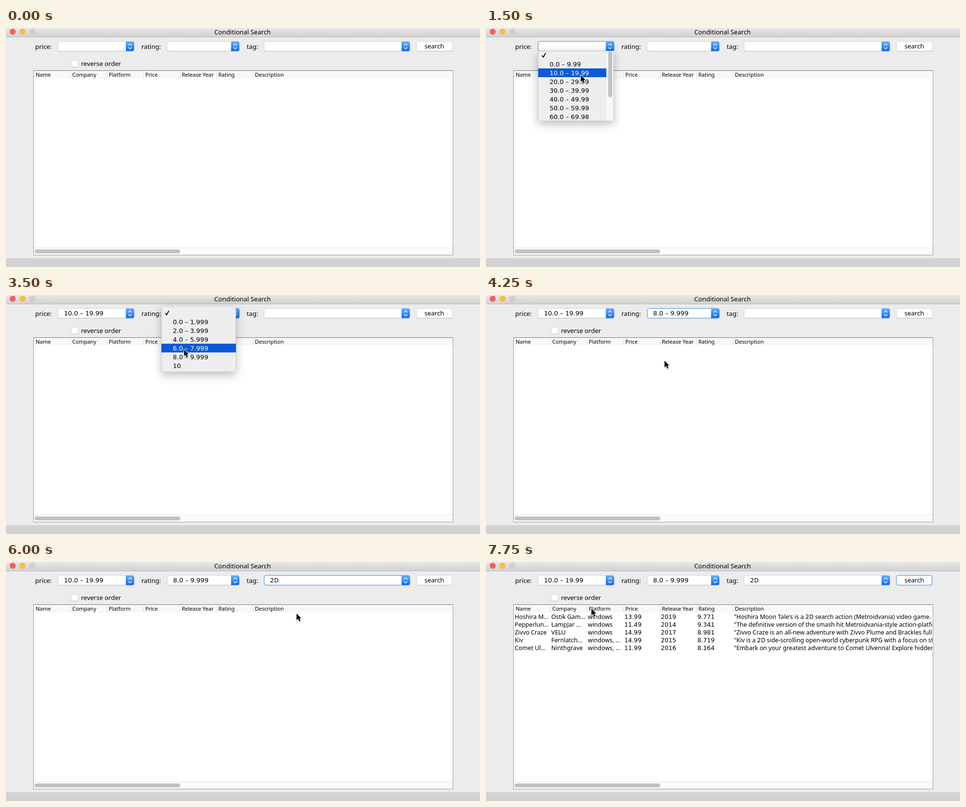
Animation of 973x491 px, one loop 8 s. Source, as an HTML page with a canvas:

```html
<!DOCTYPE html>
<html lang="en">
<head>
<meta charset="utf-8">
<title>Conditional Search</title>
<style>
html, body { margin: 0; width: 100%; height: 100%; overflow: hidden; background: #ececec; }
canvas { display: block; }
</style>
</head>
<body>
<canvas id="stage" width="973" height="491"></canvas>
<script>
const ctx = document.getElementById('stage').getContext('2d');
const LOOP = 8000, STEP = 250, ROW = 18, COLUMN = 75;
const SANS = '"Noto Sans", "Open Sans", sans-serif';
const DIGITS = '"DejaVu Sans", sans-serif';

const ranges = (count, size, tail) => Array.from({ length: count },
  (_, i) => `${i * size}.0 – ${(i + 1) * size - 1}.${tail}`);

// The chosen item appears when the menu closes
const COMBOS = [
  { label: 'price:', labelX: 60, x: 107, w: 156, scroll: 94, pick: 2,
    items: ['', ...ranges(6, 10, '99'), '60.0 – 69.98'], focus: 500, open: 750, close: 2000, blur: 3000 },
  { label: 'rating:', labelX: 278, x: 331, w: 148, scroll: 0, pick: 5,
    items: ['', ...ranges(5, 2, '999'), '10'], focus: 3000, open: 3000, close: 4250, blur: 6000 },
  { label: 'tag:', labelX: 494, x: 530, w: 299, scroll: 18, pick: 3,
    items: ['', '1980s', "1990's", '2D', '2D Fighter', '360 Video', '3D', '3D Platformer'],
    focus: 6000, open: 4750, close: 6000, blur: 6750 },
];
const SEARCH = { press: 6750, release: 7000, results: 7250 };

const HEADS = ['Name', 'Company', 'Platform', 'Price', 'Release Year', 'Rating', 'Description'];
const GAMES = [
  ['Hoshira M...', 'Ostik Gam...', 'windows', '13.99', '2019', '9.771',
    '"Hoshira Moon Tale\'s is a 2D search action (Metroidvania) video game.'],
  ['Pepperlun...', 'LampJar ...', 'windows', '11.49', '2014', '9.341',
    '"The definitive version of the smash hit Metroidvania-style action-platformer'],
  ['Zivvo Craze', 'VELU', 'windows', '14.99', '2017', '8.981',
    '"Zivvo Craze is an all-new adventure with Zivvo Plume and Brackles full of'],
  ['Kiv', 'Fernlatch...', 'windows, ...', '14.99', '2015', '8.719',
    '"Kiv is a 2D side-scrolling open-world cyberpunk RPG with a focus on story'],
  ['Comet Ul...', 'Ninthgrave', 'windows, ...', '11.99', '2016', '8.164',
    '"Embark on your greatest adventure to Comet Ulvenna! Explore hidden lands'],
];

// Places where the pointer rests between glides
const STOPS = [
  { x: 190, y: 36, arrive: 500, leave: 750 },
  { x: 194, y: 97, arrive: 1500, leave: 2000 },
  { x: 362, y: 43, arrive: 2750, leave: 3000 },
  { x: 366, y: 135, arrive: 4000, leave: 4250 },
  { x: 621, y: 40, arrive: 4750, leave: 5250 },
  { x: 596, y: 106, arrive: 5750, leave: 6000 },
  { x: 886, y: 36, arrive: 6500, leave: 7000 },
  { x: 216, y: 96, arrive: 7750, leave: LOOP },
];

const clamp = (v, lo, hi) => Math.min(hi, Math.max(lo, v));
const during = (t, from, to) => t >= from && t < to;
const easeOut = u => 1 - (1 - u) ** 2;

function pointerAt(t) {
  const i = STOPS.findIndex(s => t < s.leave);
  const to = STOPS[i], from = STOPS[i - 1] || to;
  const u = easeOut(clamp((t - from.leave) / (to.arrive - from.leave), 0, 1));
  return { x: from.x + (to.x - from.x) * u, y: from.y + (to.y - from.y) * u };
}

function rect(x, y, w, h, color) {
  ctx.fillStyle = color;
  ctx.fillRect(x, y, w, h);
}

function round(x, y, w, h, r, fill, stroke, line = 1) {
  ctx.beginPath();
  ctx.roundRect(x, y, w, h, r);
  if (fill) { ctx.fillStyle = fill; ctx.fill(); }
  if (stroke) { ctx.strokeStyle = stroke; ctx.lineWidth = line; ctx.stroke(); }
}

function polyline(points, color, width) {
  ctx.beginPath();
  points.forEach(([x, y]) => ctx.lineTo(x, y));
  ctx.strokeStyle = color;
  ctx.lineWidth = width;
  ctx.lineCap = ctx.lineJoin = 'round';
  ctx.stroke();
}

function gradient(y0, y1, top, bottom) {
  const g = ctx.createLinearGradient(0, y0, 0, y1);
  g.addColorStop(0, top);
  g.addColorStop(1, bottom);
  return g;
}

// Numerals use a wider face than letters
function text(str, x, y, size = 13, color = '#000') {
  ctx.fillStyle = color;
  for (const run of str.split(/(\d[\d. –]*)/)) {
    ctx.font = /^\d/.test(run) ? `${size}px ${DIGITS}` : `500 ${size}px ${SANS}`;
    ctx.fillText(run, x, y);
    x += ctx.measureText(run).width;
  }
}

function shadowed(blur, dy, alpha, draw) {
  ctx.save();
  ctx.shadowColor = `rgba(0,0,0,${alpha})`;
  ctx.shadowBlur = blur;
  ctx.shadowOffsetY = dy;
  draw();
  ctx.restore();
}

function field(x, y, w, h, r, fill = '#fff') {
  shadowed(1.5, 0.5, 0.3, () => round(x, y, w, h, r, fill));
  round(x + 0.5, y + 0.5, w - 1, h - 1, r, null, 'rgba(0,0,0,.08)');
}

function ring(x, w) {
  round(x, 27.5, w, 20, 4, null, '#79b4f3', 1.6);
}

function chevron(x, y, dir) {
  polyline([[x - 3, y], [x, y + 3 * dir], [x + 3, y]], '#fff', 1.4);
}

function combo({ label, labelX, x, w, items, pick, focus, close, blur }, t) {
  text(label, labelX, 43);
  field(x, 28, w, 19.5, 4);
  if (during(t, focus, blur)) ring(x, w);
  const bx = x + w - 17;
  round(bx, 27.5, 17, 20, [0, 4, 4, 0], gradient(27, 48, '#68b0fa', '#0a66fb'));
  chevron(bx + 8.5, 35.5, -1);
  chevron(bx + 8.5, 40, 1);
  if (t >= close) text(items[pick], x + 12, 42);
}

// Long lists drop below the field and scroll; short ones cover it
function menu({ x: fieldX, w: fieldW, items, scroll }, tip) {
  const [x, y, w, h] = scroll ? [fieldX, 47, fieldW - 1, 144] : [fieldX - 12, 23, fieldW + 5, 135];
  const first = scroll ? y : y + 5;
  const inner = scroll ? w - 15 : w;
  const hover = clamp(Math.floor((tip.y - first) / ROW), 0, items.length - 1);
  shadowed(18, 6, 0.27, () => round(x, y, w, h, 3, '#eee'));
  ctx.save();
  round(x, y, w, h, 3, '#eee');
  ctx.clip();
  if (scroll) {
    rect(x + inner, y, 15, h, '#f7f7f7');
    round(x + w - 11, y + 1, 8, scroll, 4, '#c1c1c1');
  }
  rect(x, first + hover * ROW, inner, ROW, '#0a5ad9');
  items.forEach((item, i) => {
    text(item, x + 23.5, first + i * ROW + 14, 13, i === hover ? '#fff' : '#000');
  });
  polyline([[x + 8.5, first + 10], [x + 10.5, first + 13], [x + 15, first + 5]], hover ? '#000' : '#fff', 1.7);
  ctx.restore();
  round(x + 0.5, y + 0.5, w - 1, h - 1, 3, null, 'rgba(0,0,0,.1)');
}

function chrome() {
  rect(0, 0, 973, 491, '#ececec');
  rect(0, 0, 973, 18, gradient(0, 18, '#e7e7e7', '#d2d2d2'));
  rect(0, 18, 973, 1, '#bababa');
  rect(0, 473, 973, 18, '#d2d2d2');
  ['#fc5b57', '#fdbd40', '#cfcfcf'].forEach((fill, i) => {
    round(7.7 + i * 20.1, 1.7, 12, 12, 6, fill, 'rgba(0,0,0,.1)', 0.8);
  });
  text('Conditional Search', 427.5, 13, 13.2);
  field(134, 66.5, 14, 13.5, 3);
  text('reverse order', 154, 78);
}

function table(filled) {
  rect(56, 87, 862, 380, '#9b9b9b');
  rect(56, 87, 862, 1, '#777');
  rect(57, 88, 860, 378, '#fff');
  rect(57, 88, 860, 16, '#f8f8f8');
  HEADS.forEach((head, i) => {
    if (i) rect(57 + i * COLUMN, 90, 1, 13, '#d9d9d9');
    text(head, 61 + i * COLUMN, 100, 11);
  });
  rect(57, 451, 860, 15, '#fafafa');
  rect(57, 451, 860, 1, '#e8e8e8');
  round(59, 455, 298.5, 8, 4, '#c1c1c1');
  if (!filled) return;
  ctx.save();
  ctx.beginPath();
  ctx.rect(57, 104, 859, 340);
  ctx.clip();
  GAMES.forEach((game, r) => game.forEach((cell, c) => {
    text(cell, 59 + c * COLUMN, 117 + r * 16, 12.3);
  }));
  ctx.restore();
}

function searchButton(t) {
  const pressed = during(t, SEARCH.press, SEARCH.release);
  field(843, 28, 73, 19.5, 4, pressed ? gradient(27, 48, '#5ca6fb', '#0a5bf2') : '#fff');
  if (t >= SEARCH.release) ring(842.5, 73);
  text('search', 859, 42);
}

function pointer({ x, y }) {
  ctx.save();
  ctx.translate(x, y);
  ctx.beginPath();
  [[0.5, 0], [0.5, 13.5], [3.6, 10.7], [6, 16], [8.4, 15], [6.1, 9.8], [10.3, 9.8]]
    .forEach(([px, py]) => ctx.lineTo(px, py));
  ctx.closePath();
  ctx.lineJoin = 'round';
  ctx.strokeStyle = '#fff';
  ctx.lineWidth = 2;
  shadowed(2, 1, 0.3, () => ctx.stroke());
  ctx.fillStyle = '#000';
  ctx.fill();
  ctx.restore();
}

function draw(t) {
  const tip = pointerAt(t);
  chrome();
  table(t >= SEARCH.results);
  COMBOS.forEach(c => combo(c, t));
  searchButton(t);
  COMBOS.filter(c => during(t, c.open, c.close)).forEach(c => menu(c, tip));
  if (t >= STOPS[0].arrive) pointer(tip);
}

const start = performance.now();
function tick() {
  const t = (performance.now() - start) % LOOP;
  draw(Math.floor(t / STEP) * STEP);
  requestAnimationFrame(tick);
}
tick();
</script>
</body>
</html>
```
